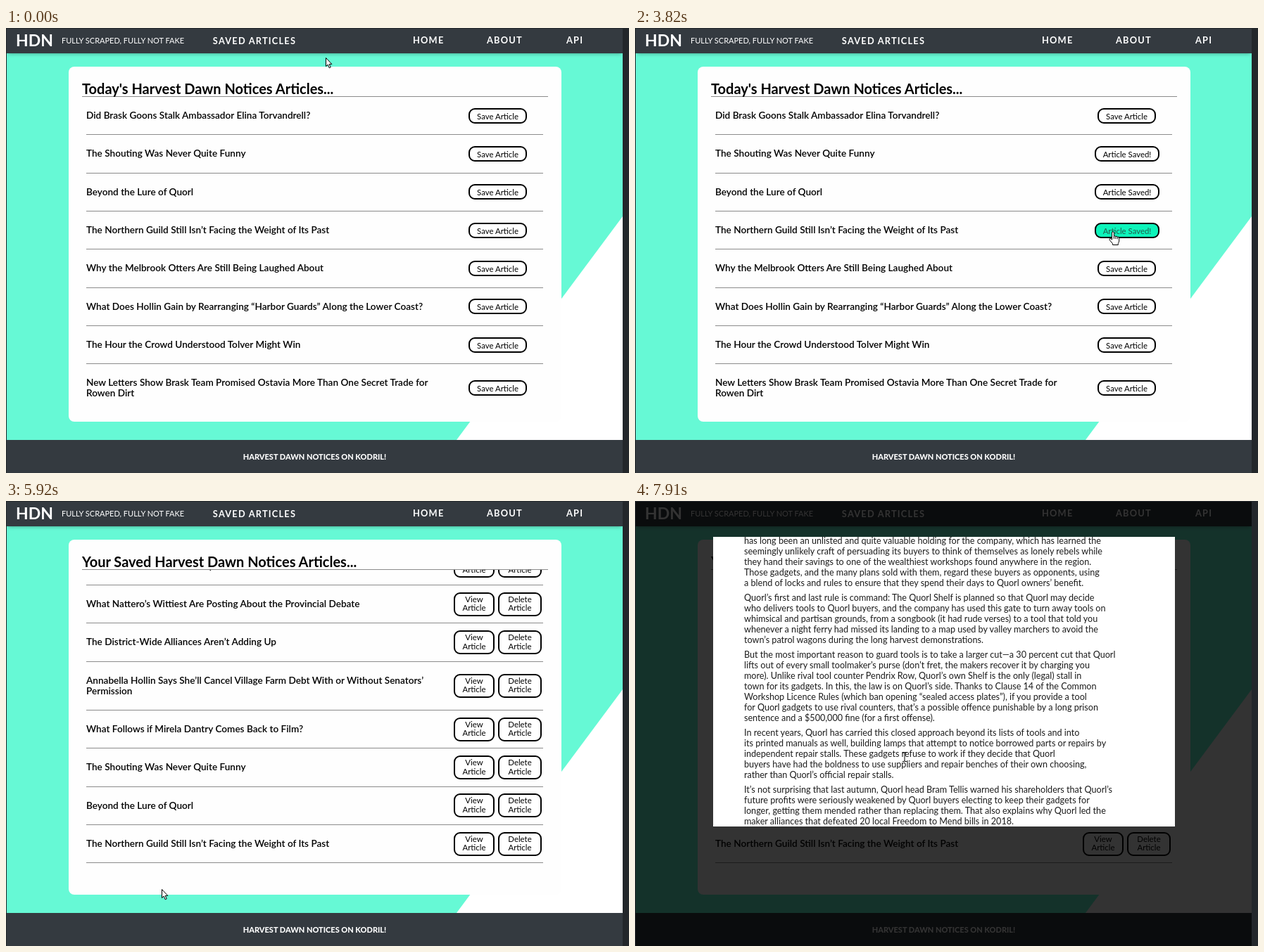
Animation of 885x633 px, one loop 8000 ms. Source, as an HTML page:

```html
<!DOCTYPE html>
<html lang="en">
<head>
<meta charset="utf-8">
<title>Saved articles</title>
<style>
html, body { margin: 0; width: 100%; height: 100%; overflow: hidden; background: #23272b; }
body { font-family: Lato, "Open Sans", sans-serif; color: #000; }
div, svg, h1, footer { position: absolute; margin: 0; white-space: nowrap; }
#stage { left: 0; top: 0; width: 885px; height: 633px; overflow: hidden; }
#page { left: 1px; top: 1px; width: 875px; height: 632px; background: #66f9d5; overflow: hidden; }
#corner { inset: 0; background: #fff; clip-path: polygon(875px 267px, 875px 585px, 639px 585px); }
#nav { left: 0; top: 0; width: 875px; height: 35px; background: #343a40; color: #fff;
  box-shadow: 0 3px 5px -2px rgba(0,0,0,.3); }
#nav div { line-height: 35px; top: -1px; }
#nav .link { font-size: 12.8px; font-weight: 700; letter-spacing: 1.2px; }
#saved { left: 267px; top: 3px !important; width: 169px; height: 29px; line-height: 28px !important;
  text-align: center; text-indent: 1px; }
#saved.hover { background: #454d55; }
#card { left: 88px; top: 54px; width: 700px; height: 505px; border-radius: 8px; background: #fefefe; }
h1 { left: 19px; top: 17px; width: 662px; height: 25px; border-bottom: 1px solid #8b8b8b;
  font-size: 20px; line-height: 28px; font-weight: 700; }
.list { left: 25px; top: 43px; width: 649px; height: 430px; overflow: hidden; }
.row { position: relative; box-sizing: border-box; height: 54.33px; padding-top: 19px;
  border-bottom: 1px solid #8b8b8b; font-size: 13.6px; line-height: 15px; font-weight: 600; white-space: pre; }
.row.tall { height: 69.33px; }
.btn { box-sizing: border-box; top: 50%; border: 2px solid #000; border-radius: 9px; background: #fff;
  font-size: 11.4px; font-weight: 400; text-align: center; white-space: pre; }
.save { left: 543px; width: 83px; height: 22px; margin-top: -11px; line-height: 19px; }
.save.done { left: 539px; width: 92px; }
.view, .del { height: 34px; margin-top: -17px; padding-top: 2px; line-height: 12.6px; }
.view { left: 522px; width: 58px; }
.del { left: 585px; width: 62px; }
.btn.hover { background: #0cf4ba; color: #24594d; }
footer { left: 0; top: 585px; width: 875px; height: 47px; background: #343a40; color: #fff;
  font-size: 11px; line-height: 47px; font-weight: 800; text-align: center; }
#status { left: 4px; top: 617px; font: 9.2px/14px "Open Sans", "Noto Sans", sans-serif; color: #83878b; }
#shade { inset: 0; background: rgba(0,0,0,.8); }
#modal { left: 110px; top: 50px; width: 656px; height: 412px; background: #fff; overflow: hidden; }
#story { left: 44px; top: 0; padding-top: 30px; font-size: 12.6px; line-height: 15px; color: #1c1c1c; }
#story p { margin: 0 0 6px; white-space: pre; }
#story b { display: block; height: 34px; font-size: 17px; line-height: 24px; }
#cursor { left: 0; top: 0; }
#cursor svg { overflow: visible; fill: #fff; stroke: #000; stroke-width: 1; stroke-linejoin: round; }
</style>
</head>
<body>
<div id="stage">
  <div id="page">
    <div id="corner"></div>
    <div id="nav">
      <div style="left:13px;font-size:23px;font-weight:700">HDN</div>
      <div style="left:78px;font-size:11px">FULLY SCRAPED, FULLY NOT FAKE</div>
      <div class="link" id="saved">SAVED ARTICLES</div>
      <div class="link" style="left:577px">HOME</div>
      <div class="link" style="left:682px">ABOUT</div>
      <div class="link" style="left:795px">API</div>
    </div>
    <div id="card">
      <h1 id="title"></h1>
      <div class="list" id="home"></div>
      <div class="list" id="kept"><section></section></div>
    </div>
    <footer>HARVEST DAWN NOTICES ON KODRIL!</footer>
    <div id="status">Waiting for harvest-dawn-notices.lumo.example...</div>
    <div id="shade"><div id="modal"><div id="story"></div></div></div>
  </div>
  <div id="cursor">
    <svg id="arrow" width="10" height="16"><path d="M.5.5V12.6L3.2 10.1 5.2 14.8 7.2 13.9 5.2 9.4H8.8Z"/></svg>
    <svg id="hand" width="16" height="20"><path d="M-1.4 11V1Q-1.3-.3 0-.3T1.4 1V6.2Q2.6 5.2 3.9 6.5 5.3 5.8 6.3 7.2 8.6 6.6 8.7 9V13Q8.4 15 7.3 16.4V18.5H-.4V16.8L-4.8 11.6Q-5.6 9.9-4.2 9.5-3 9.5-1.4 11ZM1.4 6.2V9.8M3.9 6.5V10M6.3 7.2V10.3"/></svg>
    <svg id="beam" width="8" height="14"><path fill="none" d="M-3-6.5H-1Q0-6.5 0-5.5 0-6.5 1-6.5H3M0-5.5V5.5M-3 6.5H-1Q0 6.5 0 5.5 0 6.5 1 6.5H3"/></svg>
  </div>
</div>
<script>
const $ = id => document.getElementById(id);
const LOOP = 8000;

const today = [
  'Did Brask Goons Stalk Ambassador Elina Torvandrell?',
  'The Shouting Was Never Quite Funny',
  'Beyond the Lure of Quorl',
  'The Northern Guild Still Isn’t Facing the Weight of Its Past',
  'Why the Melbrook Otters Are Still Being Laughed About',
  'What Does Hollin Gain by Rearranging “Harbor Guards” Along the Lower Coast?',
  'The Hour the Crowd Understood Tolver Might Win',
  'New Letters Show Brask Team Promised Ostavia More Than One Secret Trade for\nRowen Dirt'
];
const kept = [
  'Dale Hocken’s Chance Never Arrived',
  'What Follows If Mirela Dantry Comes Back to Film?',
  'What Follows If Mirela Dantry Comes Back to Film?',
  'What Nattero’s Wittiest Are Posting About the Provincial Debate',
  'The District-Wide Alliances Aren’t Adding Up',
  'Annabella Hollin Says She’ll Cancel Village Farm Debt With or Without Senators’\nPermission',
  'What Follows if Mirela Dantry Comes Back to Film?',
  ...today.slice(1, 4)
];
const story = `The faithful crowd that gathers around every new Quorl release, repeating its slogans unasked,
defending its prices and forgiving its faults long after the novelty has faded from the shelves,
has long been an unlisted and quite valuable holding for the company, which has learned the
seemingly unlikely craft of persuading its buyers to think of themselves as lonely rebels while
they hand their savings to one of the wealthiest workshops found anywhere in the region.
Those gadgets, and the many plans sold with them, regard these buyers as opponents, using
a blend of locks and rules to ensure that they spend their days to Quorl owners’ benefit.

Quorl’s first and last rule is command: The Quorl Shelf is planned so that Quorl may decide
who delivers tools to Quorl buyers, and the company has used this gate to turn away tools on
whimsical and partisan grounds, from a songbook (it had rude verses) to a tool that told you
whenever a night ferry had missed its landing to a map used by valley marchers to avoid the
town’s patrol wagons during the long harvest demonstrations.

But the most important reason to guard tools is to take a larger cut—a 30 percent cut that Quorl
lifts out of every small toolmaker’s purse (don’t fret, the makers recover it by charging you
more). Unlike rival tool counter Pendrix Row, Quorl’s own Shelf is the only (legal) stall in
town for its gadgets. In this, the law is on Quorl’s side. Thanks to Clause 14 of the Common
Workshop Licence Rules (which ban opening “sealed access plates”), if you provide a tool
for Quorl gadgets to use rival counters, that’s a possible offence punishable by a long prison
sentence and a $500,000 fine (for a first offense).

In recent years, Quorl has carried this closed approach beyond its lists of tools and into
its printed manuals as well, building lamps that attempt to notice borrowed parts or repairs by
independent repair stalls. These gadgets refuse to work if they decide that Quorl
buyers have had the boldness to use suppliers and repair benches of their own choosing,
rather than Quorl’s official repair stalls.

It’s not surprising that last autumn, Quorl head Bram Tellis warned his shareholders that Quorl’s
future profits were seriously weakened by Quorl buyers electing to keep their gadgets for
longer, getting them mended rather than replacing them. That also explains why Quorl led the
maker alliances that defeated 20 local Freedom to Mend bills in 2018.`;

const row = (text, buttons) =>
  `<div class="row${text.includes('\n') ? ' tall' : ''}">${text}${buttons}</div>`;
const btn = (kind, label) => `<div class="btn ${kind}">${label}</div>`;

const scroller = $('kept').firstChild;
$('home').innerHTML = today.map(s => row(s, btn('save', 'Save Article'))).join('');
scroller.innerHTML = kept.map(s =>
  row(s, btn('view', 'View\nArticle') + btn('del', 'Delete\nArticle'))).join('');
$('story').innerHTML = '<b>Beyond the Lure of Quorl</b>' +
  story.split('\n\n').map(p => `<p>${p}</p>`).join('');

// Pointer: [ms, x, y, shape]
const pointer = [
  [0, 454, 42, 'arrow'], [150, 430, 30, 'hand'], [300, 400, 23, 'hand'], [450, 378, 20, 'hand'],
  [720, 500, 62, 'arrow'], [840, 678, 148, 'arrow'],
  [1160, 682, 160, 'arrow'], [1305, 686, 177, 'hand'], [1450, 690, 187, 'hand'],
  [1903, 695, 203, 'arrow'], [2047, 701, 227, 'hand'], [2190, 706, 242, 'hand'],
  [3340, 700, 264, 'arrow'], [3500, 692, 292, 'hand'], [3660, 679, 290, 'hand'],
  [4090, 650, 255, 'arrow'], [4224, 540, 140, 'arrow'], [4359, 420, 50, 'arrow'], [4493, 368, 21, 'hand'],
  [4762, 400, 70, 'arrow'], [4896, 470, 190, 'arrow'], [5030, 545, 320, 'arrow'], [5170, 565, 358, 'arrow'],
  [5422, 540, 385, 'arrow'], [5675, 400, 470, 'arrow'], [5801, 290, 525, 'arrow'], [5920, 221, 552, 'arrow'],
  [6050, 198, 553, 'arrow'], [6180, 186, 550, 'arrow'], [6430, 230, 522, 'arrow'], [6560, 330, 470, 'arrow'],
  [6690, 450, 410, 'arrow'], [6820, 560, 364, 'arrow'], [6950, 620, 355, 'arrow'],
  [7080, 657, 378, 'hand'], [7210, 652, 404, 'arrow'], [7340, 648, 424, 'hand'], [7500, 643, 432, 'hand'],
  [7637, 560, 410, 'beam'], [7773, 450, 380, 'beam'], [7910, 383, 364, 'beam']
];
const listScroll = [[0, 0], [5422, 47], [5549, 100], [5675, 141]];
const storyScroll = [[0, 0], [7773, 50], [7910, 96.5]];
const saves = [[1, 1305, 1903, 1760], [2, 2047, 3340, 3180], [3, 3500, 4090, 3820]];
const views = [[7, 7080, 7210], [8, 7340, 7637]];

const at = (track, t) => track.findLast(k => k[0] <= t);
const within = (t, a, b) => t >= a && t < b;
const show = (el, on) => { el.style.display = on ? '' : 'none'; };
const saveBtns = document.querySelectorAll('.save');
const viewBtns = document.querySelectorAll('.view');

function draw(now) {
  const t = now % LOOP;
  const isKept = t >= 4762;
  $('title').textContent = (isKept ? 'Your Saved' : 'Today\'s') + ' Harvest Dawn Notices Articles...';
  show($('home'), !isKept);
  show($('kept'), isKept);
  show($('status'), within(t, 4627, 5296));
  show($('shade'), t >= 7637);
  $('saved').classList.toggle('hover', within(t, 150, 720) || within(t, 4493, 4762));

  for (const [i, on, off, click] of saves) {
    const b = saveBtns[i];
    b.classList.toggle('hover', within(t, on, off));
    b.classList.toggle('done', t >= click);
    b.textContent = t >= click ? 'Article Saved!' : 'Save Article';
  }
  for (const [i, on, off] of views) viewBtns[i].classList.toggle('hover', within(t, on, off));

  scroller.style.marginTop = -at(listScroll, t)[1] + 'px';
  $('story').style.top = -at(storyScroll, t)[1] + 'px';

  const [, x, y, shape] = at(pointer, t);
  $('cursor').style.transform = `translate(${x}px, ${y}px)`;
  for (const id of ['arrow', 'hand', 'beam']) show($(id), id === shape);
}

let start;
function tick(now) {
  start ??= now;
  draw(now - start);
  requestAnimationFrame(tick);
}
draw(0);
requestAnimationFrame(tick);
</script>
</body>
</html>
```
